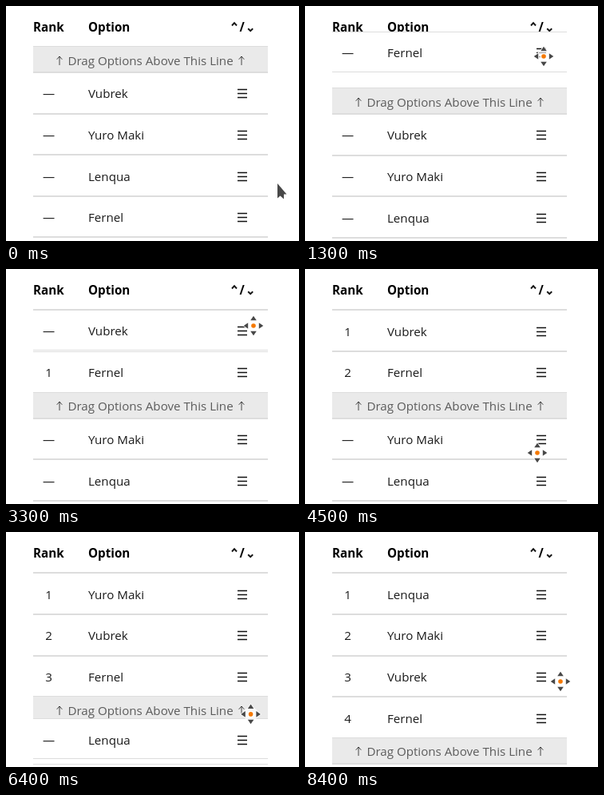
Write an HTML page that moves like this. It is 367x294 px and loops after 9800 ms.

```html
<!DOCTYPE html>
<html lang="en">
<head>
<meta charset="utf-8">
<title>Ranking by drag and drop</title>
<style>
  html, body { margin: 0; width: 100%; height: 100%; overflow: hidden; background: #fff; }
  svg { display: block; font: 400 15.15px "Open Sans", "Noto Sans", sans-serif; fill: #1a1a1a; }
  .head { font-weight: 700; font-size: 15.2px; fill: #000; }
  .mid { text-anchor: middle; }
  .note { fill: #5c5c5c; }
  .stroke { fill: none; stroke: #111; }
</style>
</head>
<body>
<svg id="stage" width="367" height="294" viewBox="0 0 367 294"></svg>
<script>
const LOOP = 9800, STEP = 100;
const LEFT = 34, WIDTH = 294, TOP = 51, ROW = 51.6, BAND = 32;
const DRAG_MS = 500, HOP_MS = 300, PAUSE = 300;
const names = ['Vubrek', 'Yuro Maki', 'Lenqua', 'Fernel'];
const LINE = 'band';

// Each row is pulled to the top: pointer goes from grab to end, row stops at rest.
const drags = [
  { item: 3, start: 800, drop: 1700, grab: [293, 270], end: [299, 63], rest: 32, bend: 2 },
  { item: 0, start: 2800, drop: 3600, grab: [299, 154], end: [310, 71], rest: 51, bend: 2.4 },
  { item: 1, start: 4500, drop: 5300, grab: [291, 230], end: [323, 77], rest: 36.2, bend: 2 },
  { item: 2, start: 6300, drop: 7600, grab: [305, 261], end: [314, 76], rest: 55, bend: 1.1 }
];

const hop = (start, to, ms = HOP_MS, bend = 2) => ({ start, to, ms, bend });
const hops = [
  ...drags.flatMap(d => [
    hop(d.start - PAUSE - HOP_MS, d.grab),
    hop(d.start, d.end, DRAG_MS, d.bend)
  ]),
  hop(1650, [310, 245]), hop(8050, [320, 187])
].sort((a, b) => a.start - b.start);

const mix = (a, b, u) => a + (b - a) * u;

// Slow at both ends; a larger bend is steeper in the middle.
function ease(t, start, ms, bend) {
  const u = Math.min(1, Math.max(0, (t - start) / ms));
  return u ** bend / (u ** bend + (1 - u) ** bend);
}

const pointer = t => hops.reduce((pos, h) => {
  const u = ease(t, h.start, h.ms, h.bend);
  return pos.map((v, i) => mix(v, h.to[i], u));
}, [340, 222]);

const rect = (y, h, fill) => `<rect x="${LEFT}" y="${y}" width="${WIDTH}" height="${h}" fill="${fill}"/>`;
const text = (x, y, s, cls = '') => `<text x="${x}" y="${y}" class="${cls}">${s}</text>`;
const stroke = (d, w) => `<path class="stroke" d="${d}" stroke-width="${w}"/>`;
const box = (y, bottom, fill) => rect(y, bottom - y, '#ddd') + rect(y + 1, bottom - y - 2, fill);

function row(item, top, rank, bottom) {
  const y = Math.round(top + 32.4);
  const bars = [10.5, 5.5, .5].map(d => `M290 ${y - d}h12`).join('');
  return box(Math.round(top), bottom, '#fff') +
    text(53.5, y, rank || '—', 'mid') + text(103, y, names[item]) + stroke(bars, 1.5);
}

function band(top) {
  const y = Math.floor(top + 23);
  const arrow = x => `M${x} ${y}v-11m-3.3 3.8l3.3-3.8l3.3 3.8`;
  return box(Math.round(top) - 1, Math.round(top + BAND), '#eaeaea') +
    text(181, y, 'Drag Options Above This Line', 'mid note') +
    `<g opacity=".75">${stroke(arrow(67) + arrow(295), 1)}</g>`;
}

function header() {
  return text(34, 32, 'Rank', 'head') + text(103, 32, 'Option', 'head') +
    text(292.5, 32, '/', 'head') +
    stroke('M283 24.5l3-3.3l3 3.3M303.2 28.3l3 2.9l3-2.9', 1.9) +
    rect(50, 1, '#ddd');
}

function cursor(t) {
  const [x, y] = pointer(t);
  const arrow = '<path d="M0 0V18.5L3.5 15.5L8 19.5V13.5H11.5Z" fill="#484848"/>';
  const tips = [0, 90, 180, 270].map(a =>
    `<path d="M0-12.3L3.8-6.8H-3.8Z" transform="rotate(${a})" fill="#484848" stroke="#fff" stroke-width="1.6" paint-order="stroke"/>`).join('');
  const move = `<circle r="9" fill="#fff" opacity=".65"/><circle r="4" fill="#fff"/>${tips}<circle r="2.8" fill="#f57900"/>`;
  return `<g transform="translate(${x.toFixed(1)} ${y.toFixed(1)})">${t < 500 ? arrow : move}</g>`;
}

// Slot tops, then the bottom of the list. A leading band shares the header's border.
function layout(order) {
  const tops = [order[0] === LINE ? TOP : TOP + .4];
  order.forEach((item, i) => tops.push(tops[i] + (item === LINE ? BAND : ROW)));
  return tops;
}

function scene(t) {
  let order = [LINE, 0, 1, 2, 3];
  for (const d of drags) {
    if (t >= d.drop) order = [d.item, ...order.filter(i => i !== d.item)];
  }
  const rank = item => {
    const i = order.indexOf(item);
    return i < order.indexOf(LINE) ? i + 1 : 0;
  };

  const drag = drags.find(d => t >= d.start && t < d.drop);
  let shown = order, dragTop = 0;
  if (drag) {
    // Leave the gap at the slot nearest to the dragged row.
    const home = layout(order)[order.indexOf(drag.item)];
    dragTop = mix(home, drag.rest, ease(t, drag.start, DRAG_MS, drag.bend + 1.5));
    const rest = order.filter(i => i !== drag.item);
    const gaps = layout(rest).map(y => Math.abs(y - dragTop));
    const slot = gaps.indexOf(Math.min(...gaps));
    shown = [...rest.slice(0, slot), drag.item, ...rest.slice(slot)];
  }

  const tops = layout(shown);
  let out = header() + rect(Math.round(tops[shown.length]), 1, '#ddd');
  shown.forEach((item, i) => {
    if (item === LINE) out += band(tops[i]);
    else if (!drag || item !== drag.item) out += row(item, tops[i], rank(item), Math.round(tops[i + 1]));
  });
  if (drag) out += row(drag.item, dragTop, rank(drag.item), Math.round(dragTop) + 51);
  return out + cursor(t);
}

const stage = document.getElementById('stage');
let last = -1;
function tick() {
  const t = Math.floor(performance.now() % LOOP / STEP) * STEP;
  if (t !== last) stage.innerHTML = scene(last = t);
  requestAnimationFrame(tick);
}
tick();
</script>
</body>
</html>
```
